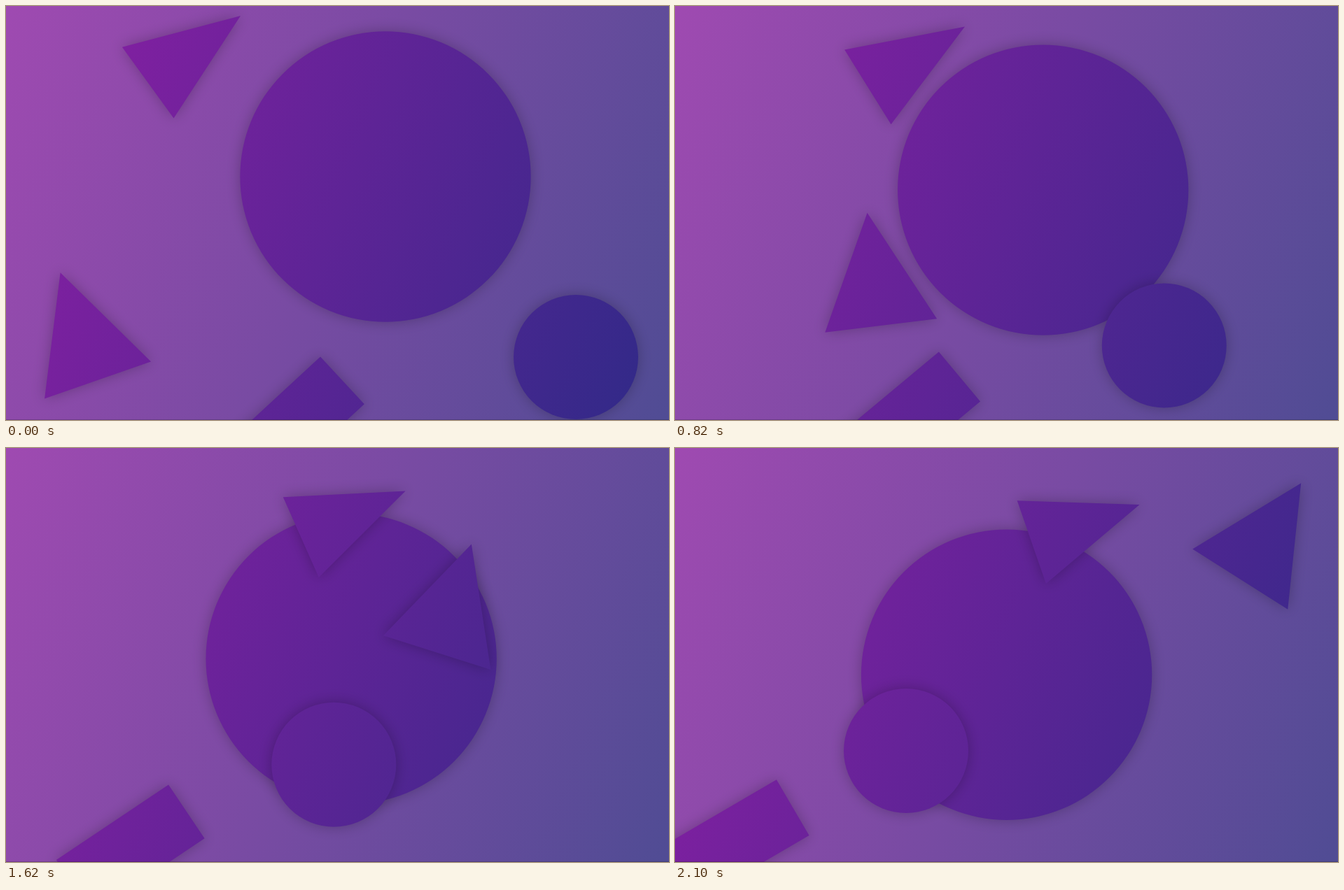
Recreate the animation shown at these times as an HTML page with a canvas. Size 947x592 px, loop 2.18 s.

```html
<!DOCTYPE html>
<html lang="en">
<head>
<meta charset="utf-8">
<title>Drifting shapes</title>
<style>
  html, body { margin: 0; width: 100%; height: 100%; overflow: hidden; }
  canvas { display: block; width: 947px; height: 592px; }
</style>
</head>
<body>
<canvas id="stage" width="947" height="592"></canvas>
<script>
const W = 947, H = 592;
const LOOP = 2180, HOLD = 500, STEP = 80, STEPS = 21;
const ctx = document.getElementById('stage').getContext('2d');

// Gradient across the stage, laid out like a CSS linear-gradient.
function slant(from, to, deg = 113) {
  const a = deg * Math.PI / 180, sx = Math.sin(a), sy = -Math.cos(a);
  const half = (W * sx + H * sy) / 2;
  const g = ctx.createLinearGradient(
    W / 2 - sx * half, H / 2 - sy * half, W / 2 + sx * half, H / 2 + sy * half);
  g.addColorStop(0, from);
  g.addColorStop(1, to);
  return g;
}

const backdrop = slant('#9f4ab1', '#504c94');
const ink = slant('#8e1ea5', '#2e2a87');

const circle = r => () => ctx.arc(0, 0, r, 0, 2 * Math.PI);
const polygon = (...points) => () => {
  points.forEach(p => ctx.lineTo(...p));
  ctx.closePath();
};

// from / to: x, y, rotation in degrees
const shapes = [
  { draw: circle(207.7), from: [542, 244, 0], to: [473.6, 324.2, 0] },
  { draw: circle(89), from: [814, 502, 0], to: [330, 433, 0] },
  { draw: polygon([-46.2, -96.5], [46.2, -96.5], [46.2, 96.5], [-46.2, 96.5]),
    from: [409.6, 600.9, 47.2], to: [85, 562.8, 59.7], flip: true },
  { draw: polygon([108.9, 0], [-54.4, 62.85], [-54.4, -62.85]),
    from: [246.8, 77.8, -35.88], to: [560.7, 116.7, -19.15] },
  { draw: polygon([96.8, 32], [-65.8, 112.5], [-65.8, -48.5]),
    from: [79.2, 483.3, -109.2], to: [815.4, 114.9, -57.66] }
];

// The rectangle's short side follows its angle; its far end points down-left.
function paint({ draw, from, to }, k) {
  const [x, y, deg] = from.map((v, i) => v + (to[i] - v) * k);
  ctx.save();
  ctx.translate(x, y);
  ctx.rotate(deg * Math.PI / 180);
  ctx.beginPath();
  draw();
  ctx.restore();
  ctx.fill();
}

function frame(now) {
  const t = now % LOOP;
  const k = t < HOLD ? 0 : (Math.floor((t - HOLD) / STEP) + 1) / STEPS;
  ctx.shadowColor = 'transparent';
  ctx.fillStyle = backdrop;
  ctx.fillRect(0, 0, W, H);
  ctx.fillStyle = ink;
  ctx.shadowColor = 'rgba(0, 0, 0, .25)';
  ctx.shadowBlur = 20;
  shapes.forEach(s => paint(s, k));
  ctx.shadowColor = 'transparent';
  ctx.fillStyle = 'rgba(0, 0, 0, .2)';
  ctx.fillRect(0, H - 1, W, 1);
  requestAnimationFrame(frame);
}
requestAnimationFrame(frame);
</script>
</body>
</html>
```
